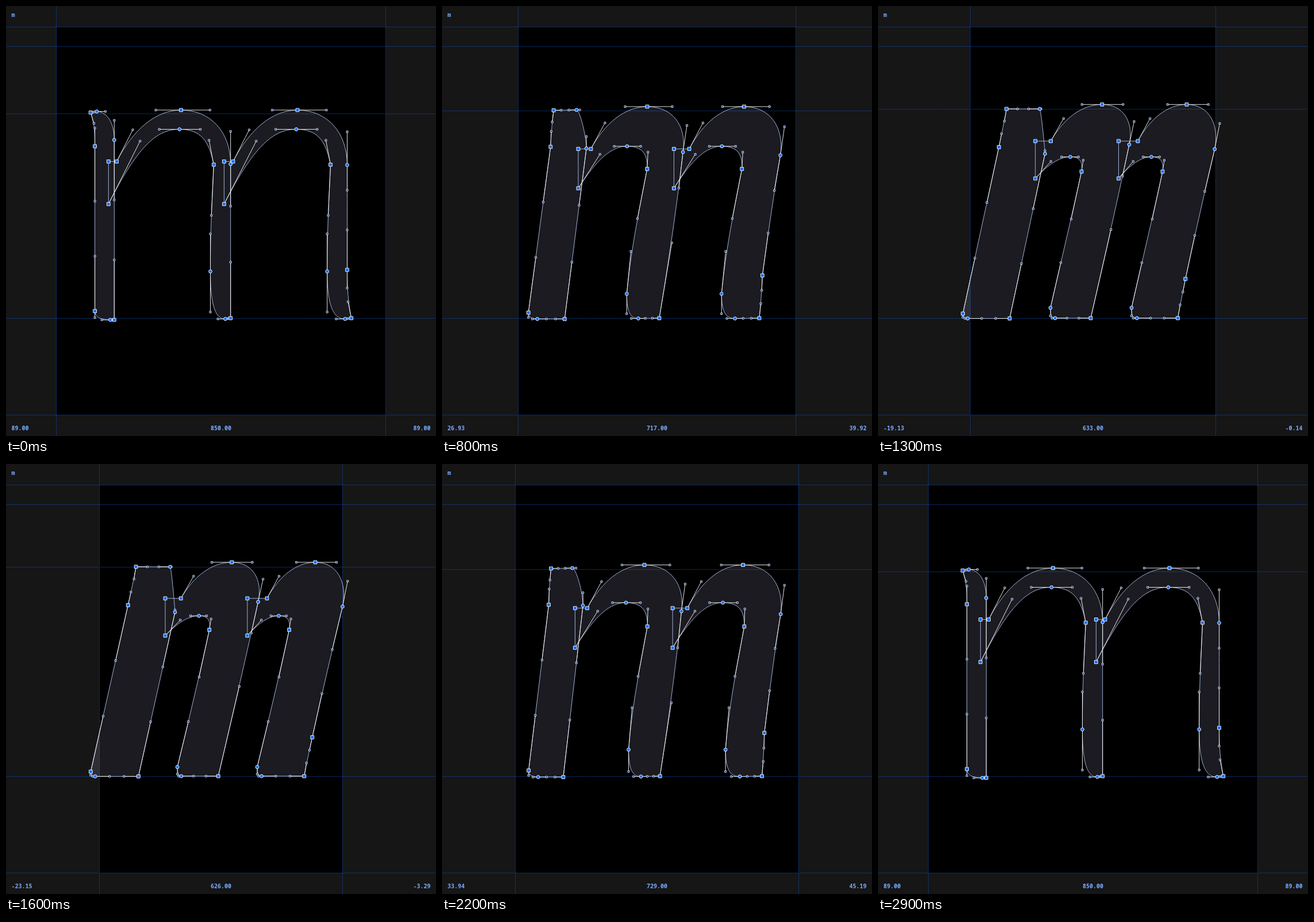
These frames come from a looping animation (748 by 748 pixels, 3000 ms). An HTML page with a canvas:

```html
<!DOCTYPE html>
<html lang="en">
<head>
<meta charset="utf-8">
<title>Glyph weight</title>
<style>
html, body { margin: 0; height: 100%; overflow: hidden; background: #161616; }
canvas { display: block; }
</style>
</head>
<body>
<canvas id="stage" width="748" height="748"></canvas>
<script>
const SIZE = 748, SCALE = 0.675, BASELINE = 543;
const ctx = document.getElementById('stage').getContext('2d');

const mix = (a, b, k) => a + (b - a) * k;
const snap = v => Math.floor(v) + 0.5;

// A node joins the next one by a curve whose handles are given
// as fractions of the box between both nodes, or by a plain line.
const THIRDS = [[1 / 3, 1 / 3], [2 / 3, 2 / 3]];
const corner = (x, y, handles) => ({ x, y, handles, round: false });
const smooth = (x, y, handles) => ({ x, y, handles, round: true });

function contour(nodes) {
  return nodes.map((a, i) => {
    const b = nodes[(i + 1) % nodes.length];
    const place = ([fx, fy]) => [mix(a.x, b.x, fx), mix(a.y, b.y, fy)];
    const [h1, h2] = (a.handles || []).map(place);
    return { from: [a.x, a.y], to: [b.x, b.y], h1, h2, round: a.round };
  });
}

// In both builders m(light, bold) gives a measure at the current weight.
function stem(m) {
  const foot = m(546, 543.5), head = m(183.5, 179);
  return contour([
    corner(m(147.2, 223.5), m(185.3, 179), [[m(0.78, 0.27), 0.32], [m(1, 0.65), m(0.46, 0.65)]]),
    corner(m(154.6, 210.3), m(244, 245.5), THIRDS),
    corner(m(154.6, 147.6), m(530.7, 535), [[0, 0.75], [0.45, 1]]),
    smooth(m(181.5, 156), foot, THIRDS),
    corner(m(188.3, 229), foot, THIRDS),
    smooth(m(188.3, 290.5), m(233, 257), [[0, m(0.69, 0.07)], [m(0.51, 0.76), 1]]),
    smooth(m(158, 281.3), head, THIRDS)
  ]);
}

function arch(m, { notch, neck, crown, counter, side, foot, outer }) {
  const inner = counter + m(53.7, -34.5);
  return contour([
    corner(notch, m(344.5, 300), [[0.445, m(0.842, 0.79)], [m(0.715, 0.75), 1]]),
    smooth(counter, m(214.5, 262.5), [[m(0.61, 0.73), 0], [m(0.865, 1.154), m(0.31, 0.225)]]),
    corner(counter + m(59.5, 19.5), m(276, 288),
      [[m(0.7, 0.333), m(0.475, 0.349)], [m(1, 0.667), m(0.648, 0.668)]]),
    smooth(inner, m(461.7, 525), [[0, m(0.855, 0.78)], [m(0.5, 0.33), 1]]),
    smooth(mix(inner, foot, m(0.74, 0.116)), m(544.4, 543), THIRDS),
    ...outer,
    smooth(side[0], side[1], [[m(0, -0.18), m(0.605, 0.575)], [m(0.417, 0.227), 1]]),
    corner(crown, m(181, 171.3), [[0.392, 0], [0.75, 0.385]]),
    corner(neck, m(270.5, 235)),
    corner(notch, m(270.5, 235))
  ]);
}

function glyph(m) {
  const foot1 = m(390.7, 370), foot2 = m(600.7, 521.5);
  const first = arch(m, {
    notch: m(178.3, 273.7), neck: m(192.5, 300.5), crown: m(304.5, 389.8),
    counter: m(301.8, 334.5), side: [m(390.7, 437), m(275, 241)], foot: foot1,
    outer: [corner(foot1, BASELINE, [[m(0.53, 0.527), m(0.364, 0.51)], [0.828, m(0.727, 0.818)]])]
  });
  const second = arch(m, {
    notch: m(379.4, 418.5), neck: m(395, 452), crown: m(507, 537),
    counter: m(505, 475.5), side: [m(593.5, 585.7), m(276.5, 249)], foot: foot2,
    outer: [
      corner(foot2, BASELINE, [[m(0.79, 0.3), 0.34], [m(1, 0.667), m(0.623, 0.667)]]),
      corner(m(593.5, 534.8), m(459, 474.8), [[0.32, m(0.381, 0.336)], [0.66, m(0.759, 0.674)]])
    ]
  });
  return [stem(m), first, second];
}

// Space beside the glyph in whole font units: a corner or the bulge of a curve,
// whichever reaches further. Each value runs from lightest to boldest.
function bearing(weight, tip, ...curve) {
  const unit = ([light, bold]) => Math.round(mix(light, bold, weight));
  const [a, b, c, d] = curve.map(unit);
  let least = unit(tip);
  for (let t = 0; t <= 1; t += 0.01) {
    const s = 1 - t;
    least = Math.min(least, a * s ** 3 + 3 * b * s * s * t + 3 * c * s * t * t + d * t ** 3);
  }
  return least.toFixed(2);
}
const leftBearing = w => bearing(w, [89, 97], [100, -37], [100, -38.7], [118, -35.5], [140, -28.5]);
const rightBearing = w => bearing(w, [89, 99], [100, -11.4], [100, -26.5], [153, -2.8], [228, 51.5]);

function line(x1, y1, x2, y2) {
  ctx.beginPath();
  ctx.moveTo(x1, y1);
  ctx.lineTo(x2, y2);
  ctx.stroke();
}

function marker([x, y], r, round) {
  ctx.beginPath();
  if (round) ctx.arc(x, y, r, 0, Math.PI * 2);
  else ctx.rect(x - r, y - r, r * 2, r * 2);
  ctx.fill();
  ctx.stroke();
}

function drawGuides(left, right, xHeight) {
  ctx.fillStyle = '#161616';
  ctx.fillRect(0, 0, SIZE, SIZE);
  ctx.fillStyle = '#000';
  ctx.fillRect(left, 36.5, right - left, 675);
  ctx.strokeStyle = '#0b4cb0';
  ctx.lineWidth = 1;
  ctx.setLineDash([1, 1]);
  for (const y of [36.5, 70.5, xHeight, BASELINE, 711.5]) line(0, snap(y), SIZE, snap(y));
  for (const x of [left, right]) line(x, 1, x, SIZE);
  ctx.setLineDash([]);
}

function drawGlyph(contours) {
  ctx.beginPath();
  for (const segs of contours) {
    ctx.moveTo(...segs[0].from);
    for (const { h1, h2, to } of segs) {
      if (h1) ctx.bezierCurveTo(...h1, ...h2, ...to);
      else ctx.lineTo(...to);
    }
    ctx.closePath();
  }
  ctx.fillStyle = 'rgba(205, 210, 255, 0.13)';
  ctx.fill();
  ctx.lineWidth = 0.9;
  ctx.strokeStyle = '#b3c2ea';
  ctx.stroke();

  const all = contours.flat(), curved = all.filter(s => s.h1);
  ctx.strokeStyle = '#fff';
  for (const { from, to, h1, h2 } of curved) {
    line(...from, ...h1);
    line(...to, ...h2);
  }
  ctx.fillStyle = '#0b2a5c';
  ctx.strokeStyle = '#dce8ff';
  for (const { h1, h2 } of curved) {
    marker(h1, 1.5);
    marker(h2, 1.5);
  }
  ctx.fillStyle = '#0a6cff';
  ctx.strokeStyle = '#fff';
  for (const { from, round } of all) marker(from, 2.9, round);
}

function label(text, x, y, align) {
  ctx.textAlign = align;
  ctx.fillText(text, x, y);
}

function draw(ms) {
  // Steps of 100 ms: 15 to get bolder, slightly quicker on the way back
  const step = Math.floor(ms % 3000 / 100);
  const weight = Math.min(step / 15, (29 - step) / 14.5);
  const width = mix(850, 600, weight), half = Math.round(width) * SCALE / 2;
  const m = (light, bold) => mix(light, bold, weight * 15 / 13);

  drawGuides(snap(SIZE / 2 - half), snap(SIZE / 2 + half), m(187.6, 179.4));
  drawGlyph(glyph(m));
  ctx.fillStyle = '#78a9ff';
  ctx.font = '600 10px "Noto Sans Mono", "DejaVu Sans Mono", monospace';
  label('m', 9.5, 19, 'left');
  label(leftBearing(weight), 9.5, 738, 'left');
  label(Math.round(width).toFixed(2), SIZE / 2, 738, 'center');
  label(rightBearing(weight), 738.5, 738, 'right');
}

const start = performance.now();
function tick() {
  draw(performance.now() - start);
  requestAnimationFrame(tick);
}
tick();
</script>
</body>
</html>
```
